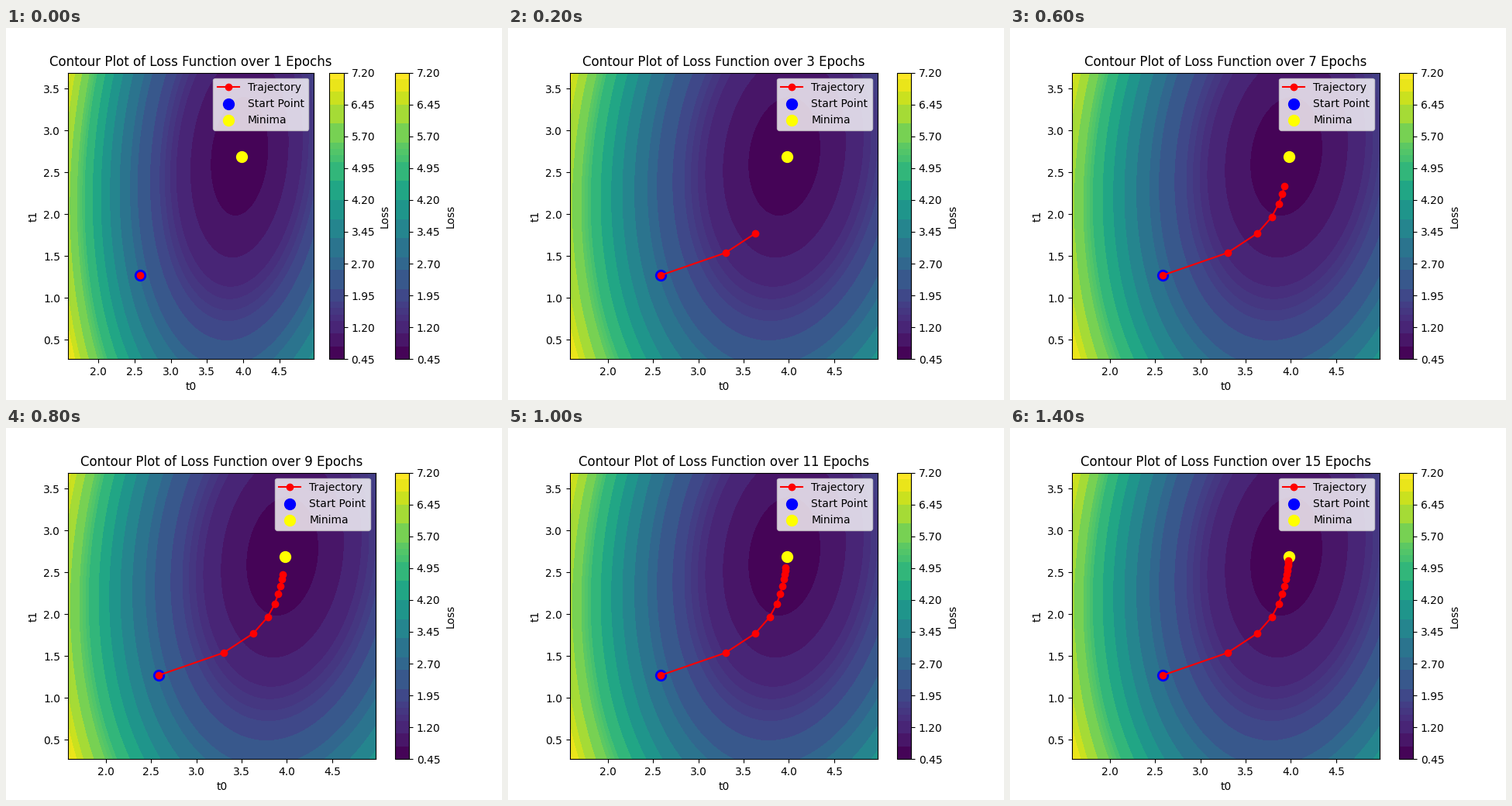
These frames come from a looping animation (640 by 480 pixels, 1500 ms). A matplotlib script:

```python
import numpy as np
import matplotlib.pyplot as plt
from matplotlib.animation import FuncAnimation

EPOCHS = 15
START = np.array([2.58, 1.267])
MINIMA = np.array([3.98, 2.689])
# Share of the remaining error kept after each epoch
DECAY = np.array([[0.443, 0.042], [0.032, 0.7786]])
# Band heights of the colour scale, in units of 0.15
BANDS = [2, 2, 2, 1, 1, 1, 2, 3, 2, 3, 3, 3, 3, 3, 1, 1, 1, 3, 3, 2, 2, 1]


def loss(t0, t1):
    u, v = t0 - 3.95, t1 - 2.689
    return 0.592 + u**2 - 0.16 * u * v + 0.317 * v**2


def descend():
    error = START - MINIMA
    path = []
    for _ in range(EPOCHS):
        path.append(MINIMA + error)
        error = DECAY @ error
    return np.array(path)


fig, ax = plt.subplots(figsize=(6.4, 4.8), dpi=100)
low, high = START - 1, MINIMA + 1
t0, t1 = np.meshgrid(np.linspace(low[0], high[0], 150),
                     np.linspace(low[1], high[1], 150))
levels = 0.45 + 0.15 * np.cumsum([0] + BANDS)
surface = ax.contourf(t0, t1, loss(t0, t1), levels=levels, cmap="viridis",
                      vmin=0.525, vmax=7.125)


def add_colorbar():
    bar = fig.colorbar(surface, ax=ax, label="Loss", spacing="proportional",
                       ticks=0.45 + 0.75 * np.arange(10), format="%.2f")
    bar.minorticks_off()
    return bar


add_colorbar()
wide = ax.get_position().frozen()
extra_bar = add_colorbar()
narrow = ax.get_position().frozen()

path = descend()
trajectory, = ax.plot([], [], "ro-", label="Trajectory")
ax.scatter(*START, color="blue", s=100, label="Start Point")
ax.scatter(*MINIMA, color="yellow", s=100, label="Minima")
ax.set(xlim=(low[0], high[0]), ylim=(low[1], high[1]),
       xlabel="t0", ylabel="t1")
ax.legend(loc="upper right")


def update(frame):
    # The first epoch is shown with a second colour bar beside the plot
    first = frame == 0
    extra_bar.ax.set_visible(first)
    ax.set_position(narrow if first else wide)
    trajectory.set_data(*path[:frame + 1].T)
    ax.set_title(f"Contour Plot of Loss Function over {frame + 1} Epochs")
    return ()


anim = FuncAnimation(fig, update, frames=EPOCHS, interval=100, repeat=True)
plt.show()
```
